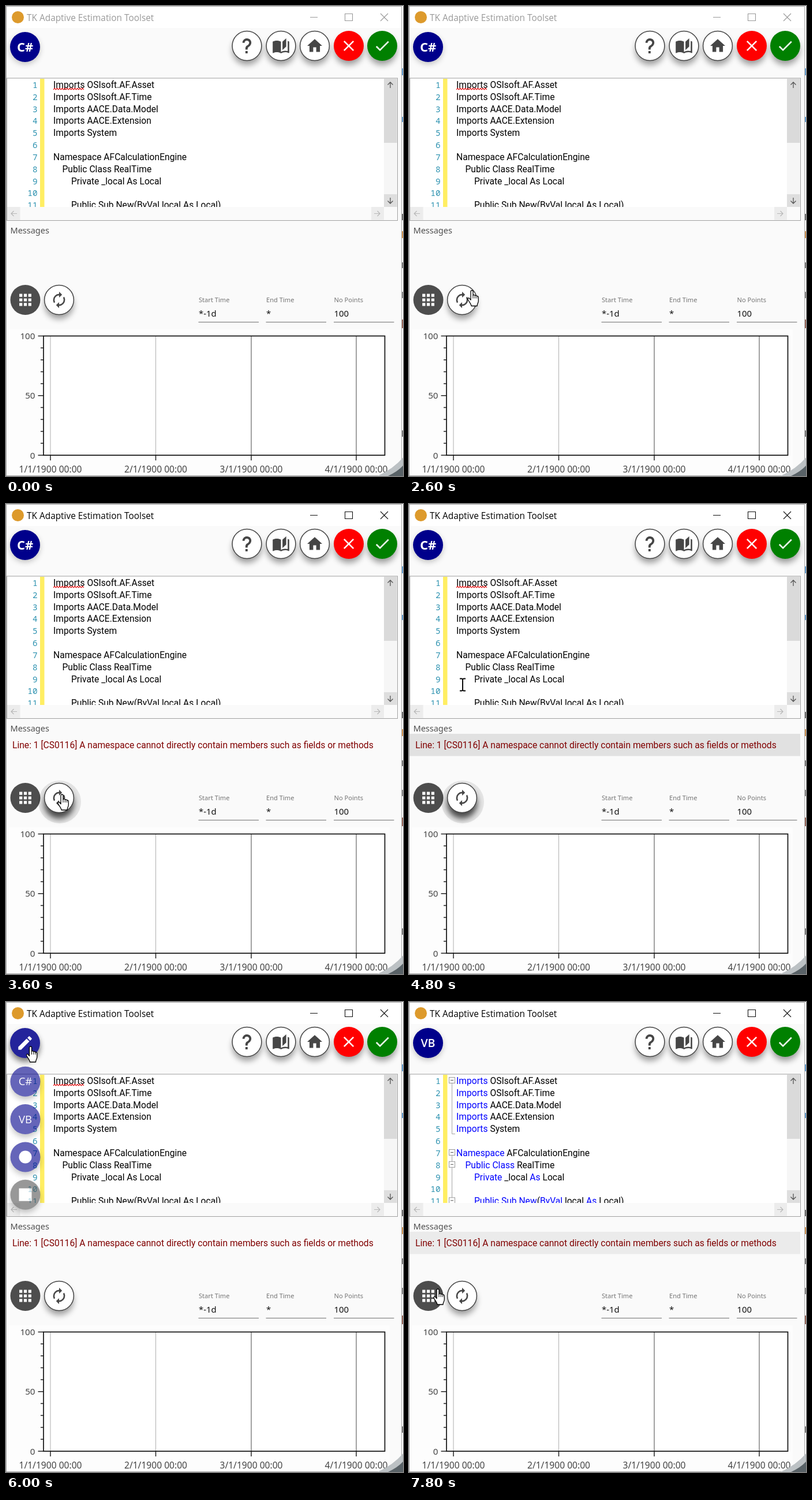
An HTML page that plays this animation: 688x814 px, repeating every 8 s.

```html
<!DOCTYPE html>
<html lang="en">
<head>
<meta charset="utf-8">
<title>Calculation editor</title>
<style>
html, body { margin: 0; width: 100%; height: 100%; overflow: hidden; background: #fff; }
svg { display: block; width: 688px; height: 814px; }
text { white-space: pre; }
.ui { font-family: "Open Sans", sans-serif; }
.noto { font-family: "Noto Sans", sans-serif; }
.code { font: 15.63px Roboto, sans-serif; }
.num { font: 14.3px "Noto Sans Mono", monospace; fill: #2b91af; text-anchor: end; }
.mid { text-anchor: middle; }
</style>
</head>
<body>
<svg id="stage" viewBox="0 0 688 814" xmlns="http://www.w3.org/2000/svg"></svg>
<script>
const LOOP = 8000, STEP = 200, PITCH = 20.83;
const DARK = '#464646', NAVY = '#00008b';

const icons = {
  help: 'M10,19H13V22H10V19M12,2C17.35,2.22 19.68,7.62 16.5,11.67C15.67,12.67 14.33,13.33 13.67,14.17C13,15 13,16 13,17H10C10,15.33 10,13.92 10.67,12.92C11.33,11.92 12.67,11.33 13.5,10.67C15.92,8.43 15.32,5.26 12,5A3,3 0 0,0 9,8H6A6,6 0 0,1 12,2Z',
  book: 'M19 2L14 6.5V17.5L19 13V2M6.5 5C4.55 5 2.45 5.4 1 6.5V21.2C1 21.5 1.4 21.7 1.75 21.6C3.1 20.9 5 20.5 6.5 20.5C8.45 20.5 10.55 20.9 12 22C13.35 21.15 15.8 20.5 17.5 20.5C19.15 20.5 20.85 20.8 22.25 21.56C22.6 21.7 23 21.4 23 21.1V6.5C22.4 6.05 21.75 5.75 21 5.5V19C19.9 18.65 18.7 18.5 17.5 18.5C15.8 18.5 13.35 19.15 12 20V6.5C10.55 5.4 8.45 5 6.5 5Z',
  home: 'M10,20V14H14V20H19V12H22L12,3L2,12H5V20H10Z',
  close: 'M19,6.41L17.59,5L12,10.59L6.41,5L5,6.41L10.59,12L5,17.59L6.41,19L12,13.41L17.59,19L19,17.59L13.41,12L19,6.41Z',
  check: 'M21,7L9,19L3.5,13.5L4.91,12.09L9,16.17L19.59,5.59L21,7Z',
  apps: 'M4,4h4v4h-4zM10,4h4v4h-4zM16,4h4v4h-4zM4,10h4v4h-4zM10,10h4v4h-4zM16,10h4v4h-4zM4,16h4v4h-4zM10,16h4v4h-4zM16,16h4v4h-4z',
  renew: 'M12,6V9L16,5L12,1V4A8,8 0 0,0 4,12C4,13.57 4.46,15.03 5.24,16.26L6.7,14.8C6.25,13.97 6,13 6,12A6,6 0 0,1 12,6M18.76,7.74L17.3,9.2C17.74,10.04 18,11 18,12A6,6 0 0,1 12,18V15L8,19L12,23V20A8,8 0 0,0 20,12C20,10.43 19.54,8.97 18.76,7.74Z',
  pencil: 'M20.71,7.04C21.1,6.65 21.1,6 20.71,5.63L18.37,3.29C18,2.9 17.35,2.9 16.96,3.29L15.12,5.12L18.87,8.87M3,17.25V21H6.75L17.81,9.93L14.06,6.18L3,17.25Z'
};

const rect = (x, y, w, h, fill, more = '') => `<rect x="${x}" y="${y}" width="${w}" height="${h}" fill="${fill}" ${more}/>`;
const path = (d, color, width = 1, more = '') => `<path d="${d}" fill="none" stroke="${color}" stroke-width="${width}" ${more}/>`;
const text = (x, y, str, cls, size, fill, more = '') =>
  `<text x="${x}" y="${y}" class="${cls}" ${size ? `font-size="${size}"` : ''} fill="${fill}" ${more}>${str}</text>`;
const circle = (x, y, r, fill, more = '') => `<circle cx="${x}" cy="${y}" r="${r}" fill="${fill}" ${more}/>`;
const icon = (name, x, y, fill) =>
  `<path d="${icons[name]}" transform="translate(${x} ${y}) scale(1.3) translate(-12 -12)" fill="${fill}"/>`;
const shadow = (x, y, o = .38, dy = 8) => circle(x, y + dy, 25, '#000', `opacity="${o}" filter="url(#blur)"`);
const disc = (x, y, fill) => circle(x, y, 26, fill);
const ring = (x, y) => circle(x, y, 25.4, '#fff', `stroke="${DARK}" stroke-width="1.5"`);
const group = (id, body) => `<g id="${id}">${body}</g>`;

const lines = [
  '*Imports* OSIsoft.AF.Asset', '*Imports* OSIsoft.AF.Time', '*Imports* AACE.Data.Model',
  '*Imports* AACE.Extension', '*Imports* System', '', '*Namespace* AFCalculationEngine',
  '    *Public Class* RealTime', '        *Private* _local *As* Local', '',
  '        *Public Sub New*(*ByVal* local *As* Local)'
];

function windowFrame() {
  const bits = [[108, 12, '#3a86c8'], [192, 9, '#3a86c8'], [360, 11, '#444'], [390, 12, '#c87820'],
    [444, 10, '#555'], [495, 11, '#666'], [543, 15, '#7a3a2a'], [735, 11, '#555']];
  return rect(0, 0, 688, 814, '#fff') + rect(1, 1, 685, 812, '#fafafa') + rect(1, 1, 685, 37, '#fff') +
    bits.map(([y, h, c]) => rect(686.5, y, 1.5, h, c)).join('') +
    path('M.5,814V.5H685.5V813.5H0', '#a6a6a6') +
    circle(20.5, 19.5, 10.5, '#dd9a2c') +
    text(36, 26, 'TK Adaptive Estimation Toolset', 'ui', 15.4, '#999', 'id="title"') +
    path('M527,19.5H540M587.5,13.5H600.5V25.5H587.5ZM649,13L662,26M662,13L649,26', '#999', 1.1, 'id="caption"');
}

function toolbar() {
  const tools = [['help', 417.5], ['book', 476.5], ['home', 535], ['close', 594, '#f00'], ['check', 652, '#008000']];
  return tools.map(([name, x, fill]) => shadow(x, 69) +
    (fill ? disc(x, 69, fill) : ring(x, 69)) + icon(name, x, 69, fill ? '#fff' : DARK)).join('');
}

function editor() {
  const base = i => 142 + i * PITCH;
  const wave = 'M82,145' + 'l2.2,-2.6l2.2,2.6'.repeat(12);
  const box = i => rect(69.5, base(i) - 11.5, 10, 10, '#fff', 'stroke="#999"') + path(`M72,${base(i) - 6.5}h5`, '#555');
  const code = lines.map((s, i) => {
    const spans = s.replace(/\*([^*]+)\*/g, '<tspan class="kw">$1</tspan>');
    return text(82, base(i), spans, 'code', 0, '#000') + text(54.5, base(i), i + 1, 'num', 0, '');
  }).join('');
  return rect(1.5, 125, 677, 246.5, '#fff', 'stroke="#a0a0a0"') +
    rect(59, 126, 7.5, 229, '#ffee62') +
    `<g clip-path="url(#page)">${code}${path(wave, '#e00000', 1.1, 'id="wave"')}` +
    group('folds', path('M74.5,141V228.5H80M74.5,266V340', '#a5a5a5') + [0, 6, 7, 10].map(box).join('')) + '</g>' +
    rect(655, 126, 22.5, 222, '#f6f6f6') + rect(655, 126, 22.5, 111, '#dadada') + rect(655, 326, 22.5, 22, '#dedede') +
    rect(2, 348, 675.5, 23, '#fafafa') + rect(2, 348, 22.5, 22.5, '#ececec') + rect(633, 348, 22, 22.5, '#ececec') +
    path('M666,142V132M661.5,136.5L666,132L670.5,136.5M666,332V342M661.5,337.5L666,342L670.5,337.5', '#555', 1.3) +
    path('M19,359.5H9M13.5,355L9,359.5L13.5,364M638,359.5H648M643.5,355L648,359.5L643.5,364', '#b8b8b8', 1.2);
}

function lowerPane() {
  const field = (x, label, value) => text(x, 513, label, 'noto', 11.1, '#757575') +
    text(x, 538, value, 'noto', 14.9, '#111') + path(`M${x - .5},547.5h104.5`, '#707070');
  return text(7.5, 394, 'Messages', 'noto', 14.5, '#505050') +
    rect(1, 398, 677, 38.5, '#000', 'id="row"') +
    text(11, 422.5, 'Line: 1 [CS0116] A namespace cannot directly contain members such as fields or methods', 'code', 0, '#800000', 'id="msg"') +
    disc(33.5, 509, '#4d4d4d') + icon('apps', 33.5, 509, '#fff') +
    shadow(92, 509) + group('focus', circle(93, 516, 37, '#000', 'opacity=".09"') + shadow(92, 509, .5, 11)) +
    ring(92, 509) + icon('renew', 92, 509, DARK) + circle(92, 509, 25, '#000', 'id="ripple"') +
    field(334, 'Start Time', '*-1d') + field(451, 'End Time', '*') + field(568.5, 'No Points', '100');
}

function chart() {
  const top = 571.5, bottom = 778, unit = (bottom - top) / 10;
  let out = rect(5, 560, 660, 252, '#fdfdfd') + rect(65, top, 591.5, bottom - top, '#fff');
  [77, 259.5, 425, 607].forEach((x, i) => {
    out += path(`M${x},${top}V${bottom}`, i < 2 ? '#b4b4b4' : '#8a8a8a', i < 2 ? 1.1 : 1.6) +
      path(`M${x},${bottom}v9`, '#222', 1.5) +
      text(x, 807.5, `${i + 1}/1/1900 00:00`, 'noto mid', 15.6, '#444');
  });
  for (let i = 0; i <= 10; i++) {
    const y = bottom - i * unit, major = i % 5 === 0;
    out += path(`M${major ? 55.5 : 60},${y}H65`, '#222', 1.5);
    if (major) out += text(50.5, y + 5.7, i * 10, 'noto', 15.2, '#444', 'text-anchor="end"');
  }
  return out + rect(65, top, 591.5, bottom - top, 'none', 'stroke="#111" stroke-width="1.7"') +
    '<path d="M644,814Q672,801 688,782V814Z" fill="#bcc1c4"/><path d="M662,814Q679,806 688,796V814Z" fill="#596267"/>';
}

function languageMenu() {
  const label = s => text(0, 6.5, s, 'ui mid', 18.5, '#fff');
  const faces = [label('C#'), label('VB'), circle(0, 0, 11, '#fff'), rect(-11, -11, 22, 22, '#fff')];
  const items = faces.map((face, i) =>
    `<g class="item">${shadow(0, 0, .4, 6)}${disc(0, 0, i < 3 ? NAVY : '#555')}${face}</g>`).join('');
  return group('menu', items) + circle(36, 203, 8.5, '#d02840', 'id="spot" opacity=".75"') +
    shadow(33, 71, .25, 4) + group('lift', shadow(33, 71, .4, 8)) + circle(33, 71, 26, NAVY, 'id="main"') +
    group('faceCs', text(33, 79, 'C#', 'ui mid', 22, '#fff', 'font-weight="700"')) +
    group('facePen', icon('pencil', 33, 71, '#fff')) +
    group('faceVb', text(33, 78, 'VB', 'ui mid', 19.5, '#fff', 'font-weight="600"'));
}

function pointers() {
  const solid = d => `<path d="${d}" fill="#fff" stroke="#000" stroke-width="1.3" stroke-linejoin="round"/>`;
  const beam = 'M-5,-10.5H-1.5L0,-9.5L1.5,-10.5H5M0,-9.5V9.5M-5,10.5H-1.5L0,9.5L1.5,10.5H5';
  return group('cursor',
    group('arrow', solid('M0,0V17L4,13.2L6.6,19.2L9.2,18L6.6,12.2H12Z')) +
    group('beam', path(beam, '#fff', 4) + path(beam, '#000', 1.9)) +
    group('hand', solid('M-2,2C-2,-.7 2,-.7 2,2V9C2,7.2 5.4,7.4 5.4,9.5C6,8.2 8.6,8.5 8.6,10.6C9.2,9.4 11.3,10 11.3,12V18C11.3,22 9,22.5 9,27H-1C-1,24 -4,21 -6.5,16.5C-8,13.5 -5.6,12.2 -4,14.2L-2,16.5Z') +
      path('M2,9V14M5.4,10V14M8.6,11V14', '#000', 1)));
}

const stage = document.getElementById('stage');
stage.innerHTML = `<defs>
  <filter id="blur" x="-50%" y="-50%" width="200%" height="200%"><feGaussianBlur stdDeviation="5.5"/></filter>
  <clipPath id="page"><rect x="2" y="126" width="652" height="222"/></clipPath></defs>` +
  windowFrame() + toolbar() + editor() + lowerPane() + chart() + languageMenu() + pointers();

const $ = id => document.getElementById(id);
const show = (id, on) => $(id).setAttribute('display', on ? 'inline' : 'none');
const set = (id, name, value) => $(id).setAttribute(name, value);
const keywords = stage.querySelectorAll('.kw'), items = stage.querySelectorAll('.item');

const route = [
  [1200, 671, 134, 'arrow'], [1400, 558, 298, 'beam'], [1600, 512, 306, 'beam'], [1800, 410, 342, 'arrow'],
  [2200, 163, 452, 'arrow'], [2400, 122, 482, 'arrow'], [2600, 109, 492.5, 'hand'], [3000, 97, 503, 'hand'],
  [4200, 97, 503, 'hand'], [4400, 96, 470, 'arrow'], [4800, 93, 313, 'beam'], [5200, 52, 112, 'arrow'],
  [5400, 42.5, 77, 'hand'], [6200, 42.5, 77, 'hand'], [6800, 37.5, 205, 'hand'], [7000, 37.5, 205, 'hand'],
  [7200, 39, 250, 'beam'], [7600, 46, 405, 'arrow'], [7800, 50, 497, 'hand']
];
const rowShade = { 4600: .1, 4800: .1, 5000: .04, 7600: .1, 7800: .06 };
const menuSpread = { 5800: .6, 6000: 1.014, 7200: .55 };

function moveCursor(t) {
  show('cursor', t >= 1200);
  if (t < 1200) return;
  const i = route.findLastIndex(k => k[0] <= t);
  const a = route[i], b = route[i + 1] || a;
  const p = b === a ? 0 : (t - a[0]) / (b[0] - a[0]);
  set('cursor', 'transform', `translate(${a[1] + (b[1] - a[1]) * p} ${a[2] + (b[2] - a[2]) * p})`);
  for (const kind of ['arrow', 'beam', 'hand']) show(kind, kind === a[3]);
}

function update(time) {
  const t = Math.floor(time / STEP) * STEP;
  const active = t >= 3000, colored = t >= 7000, chosen = t >= 7200;
  const penShown = t >= 5600 && !chosen, hovered = t >= 5400 && t < 6400;

  set('title', 'fill', active ? '#000' : '#999');
  set('caption', 'stroke', active ? '#111' : '#999');
  show('msg', t >= 3400);
  set('row', 'opacity', rowShade[t] || 0);
  show('focus', active && t < 5600);
  set('ripple', 'opacity', { 3000: .16, 3200: .12, 3400: .05 }[t] || 0);

  keywords.forEach(k => k.setAttribute('fill', colored ? '#00f' : '#000'));
  show('wave', !chosen);
  show('folds', chosen);

  const spread = menuSpread[t] || 1;
  show('menu', t >= 5800 && t < 7400);
  set('menu', 'opacity', .6 * Math.min(1, spread));
  items.forEach((g, i) => g.setAttribute('transform', `translate(33.5 ${72.5 + (i + 1) * 64.4 * spread})`));
  show('spot', t === 7000);

  show('faceCs', t < 5600);
  show('facePen', penShown);
  show('faceVb', chosen);
  show('lift', hovered);
  set('main', 'fill', hovered ? '#24249b' : NAVY);
  moveCursor(t);
}

const start = performance.now();
function tick() {
  update((performance.now() - start) % LOOP);
  requestAnimationFrame(tick);
}
tick();
</script>
</body>
</html>
```
